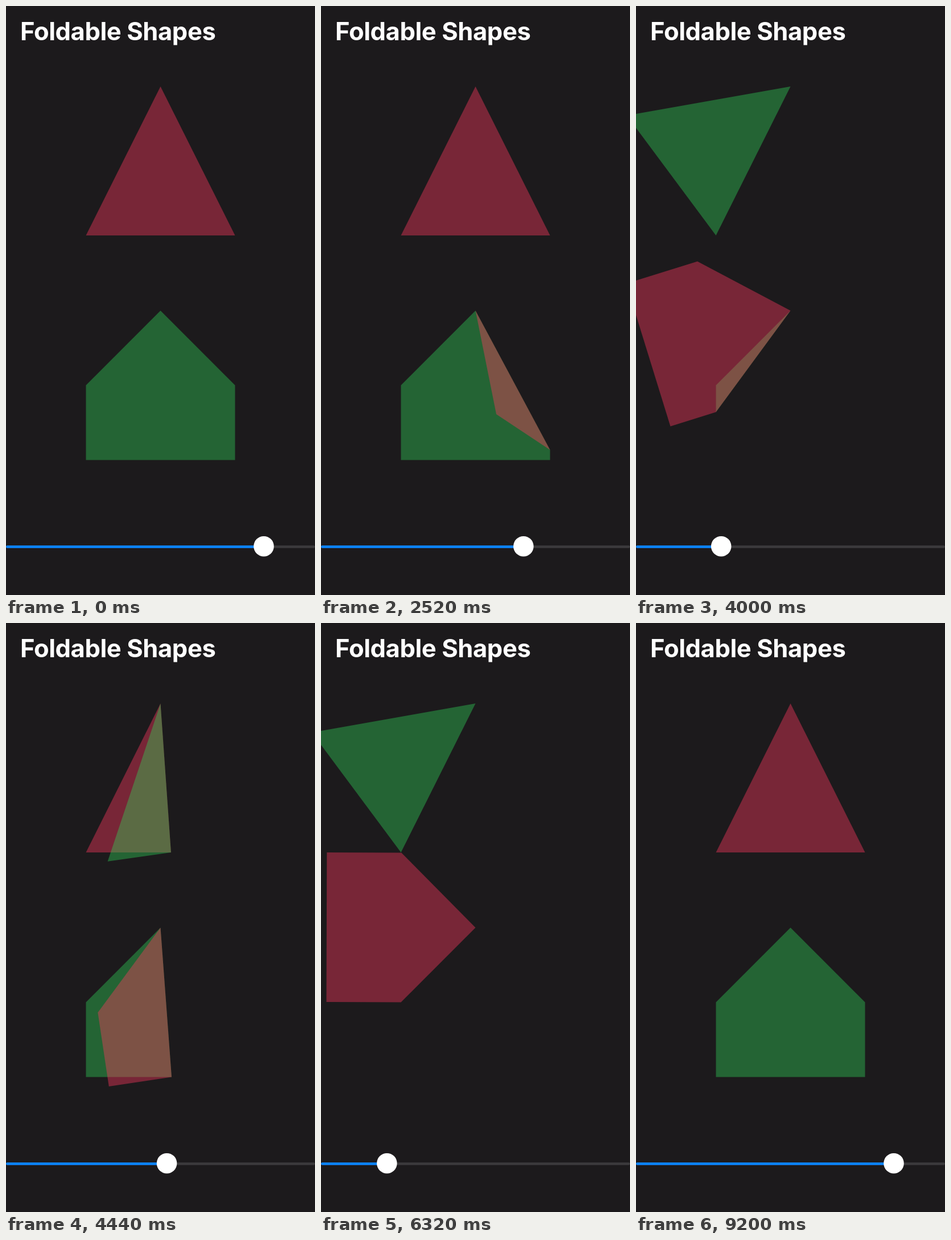
These frames come from a looping animation (543 px wide and 1032 px high, 9.68 s). An HTML page with a canvas:

```html
<!DOCTYPE html>
<html lang="en">
<head>
<meta charset="utf-8">
<title>Foldable Shapes</title>
<style>
  html, body { margin: 0; width: 100%; height: 100%; overflow: hidden; background: #1c1a1c; }
  canvas { display: block; }
</style>
</head>
<body>
<canvas id="stage" width="543" height="1032"></canvas>
<script>
const ctx = document.getElementById('stage').getContext('2d');
const LOOP = 9680, STEP = 40;
const RED = 'rgba(255, 55, 95, 0.405)', GREEN = 'rgba(48, 209, 88, 0.405)';
const KNOB_MIN = 18, KNOB_TRAVEL = 507, TRACK_Y = 947.5, TRACK_HEIGHT = 4.6;

// Turning points of the slider drag: [time in ms, knob centre x].
const drag = [
  [480, 453], [920, 130], [1945, 445], [3625, 105],
  [5225, 450], [6420, 110], [7678, 453]
];

// Outlines start at the apex and run down the left side.
const triangle = [[271.5, 141], [140.5, 402], [402.5, 402]];
const house = [[271.5, 533.8], [140.5, 664.4], [140.5, 795.4], [402.5, 795.4], [402.5, 664.4]];

function knobAt(time) {
  if (time <= drag[0][0]) return drag[0][1];
  for (let i = 1; i < drag.length; i++) {
    const [t0, x0] = drag[i - 1], [t1, x1] = drag[i];
    if (time < t1) return x0 + (x1 - x0) * (1 - Math.cos(Math.PI * (time - t0) / (t1 - t0))) / 2;
  }
  return drag[drag.length - 1][1];
}

function fillPolygon(points, color) {
  ctx.beginPath();
  points.forEach(([x, y]) => ctx.lineTo(x, y));
  ctx.closePath();
  ctx.fillStyle = color;
  ctx.fill();
}

// Mirrors a point across the line through a and b.
function reflect([x, y], [ax, ay], [bx, by]) {
  const dx = bx - ax, dy = by - ay;
  const k = 2 * ((x - ax) * dx + (y - ay) * dy) / (dx * dx + dy * dy);
  return [2 * ax - x + k * dx, 2 * ay - y + k * dy];
}

// The crease runs from the apex to a point at the given fraction of the perimeter.
function drawFolded(outline, fraction, frontColor, backColor) {
  const apex = outline[0], closed = [...outline, apex];
  const sides = outline.map(([x, y], i) => Math.hypot(closed[i + 1][0] - x, closed[i + 1][1] - y));
  const last = sides.length - 1;
  let rest = fraction * sides.reduce((sum, side) => sum + side, 0);
  let i = 0;
  while (rest > sides[i] && i < last) rest -= sides[i++];

  // On the sides touching the apex the crease lies along the whole edge.
  if (i === 0) return fillPolygon(outline.map(p => reflect(p, apex, outline[1])), backColor);
  if (i === last) return fillPolygon(outline, frontColor);

  const k = rest / sides[i], [x0, y0] = closed[i], [x1, y1] = closed[i + 1];
  const crease = [x0 + (x1 - x0) * k, y0 + (y1 - y0) * k];
  const flap = [crease, ...closed.slice(i + 1)];
  fillPolygon([...closed.slice(0, i + 1), crease], frontColor);
  fillPolygon(flap.map(p => reflect(p, apex, crease)), backColor);
}

function drawTrack(width, color) {
  ctx.beginPath();
  ctx.roundRect(0, TRACK_Y - TRACK_HEIGHT / 2, width, TRACK_HEIGHT, TRACK_HEIGHT / 2);
  ctx.fillStyle = color;
  ctx.fill();
}

function drawSlider(x) {
  drawTrack(543, '#3b3a3c');
  drawTrack(x, '#0a84ff');
  ctx.beginPath();
  ctx.arc(x, 946.7, 17.8, 0, 2 * Math.PI);
  ctx.fillStyle = '#fff';
  ctx.fill();
}

function drawTitle() {
  ctx.font = '700 43.5px Inter, sans-serif';
  ctx.letterSpacing = '-0.4px';
  ctx.fillStyle = '#fff';
  ctx.fillText('Foldable Shapes', 25, 60);
}

function render(time) {
  const knob = knobAt(time), fraction = (knob - KNOB_MIN) / KNOB_TRAVEL;
  ctx.fillStyle = '#1c1a1c';
  ctx.fillRect(0, 0, 543, 1032);
  drawTitle();
  drawFolded(triangle, fraction, RED, GREEN);
  drawFolded(house, fraction, GREEN, RED);
  drawSlider(knob);
}

const start = performance.now();
function tick() {
  const time = (performance.now() - start) % LOOP;
  render(Math.floor(time / STEP) * STEP);
  requestAnimationFrame(tick);
}
tick();
</script>
</body>
</html>
```
